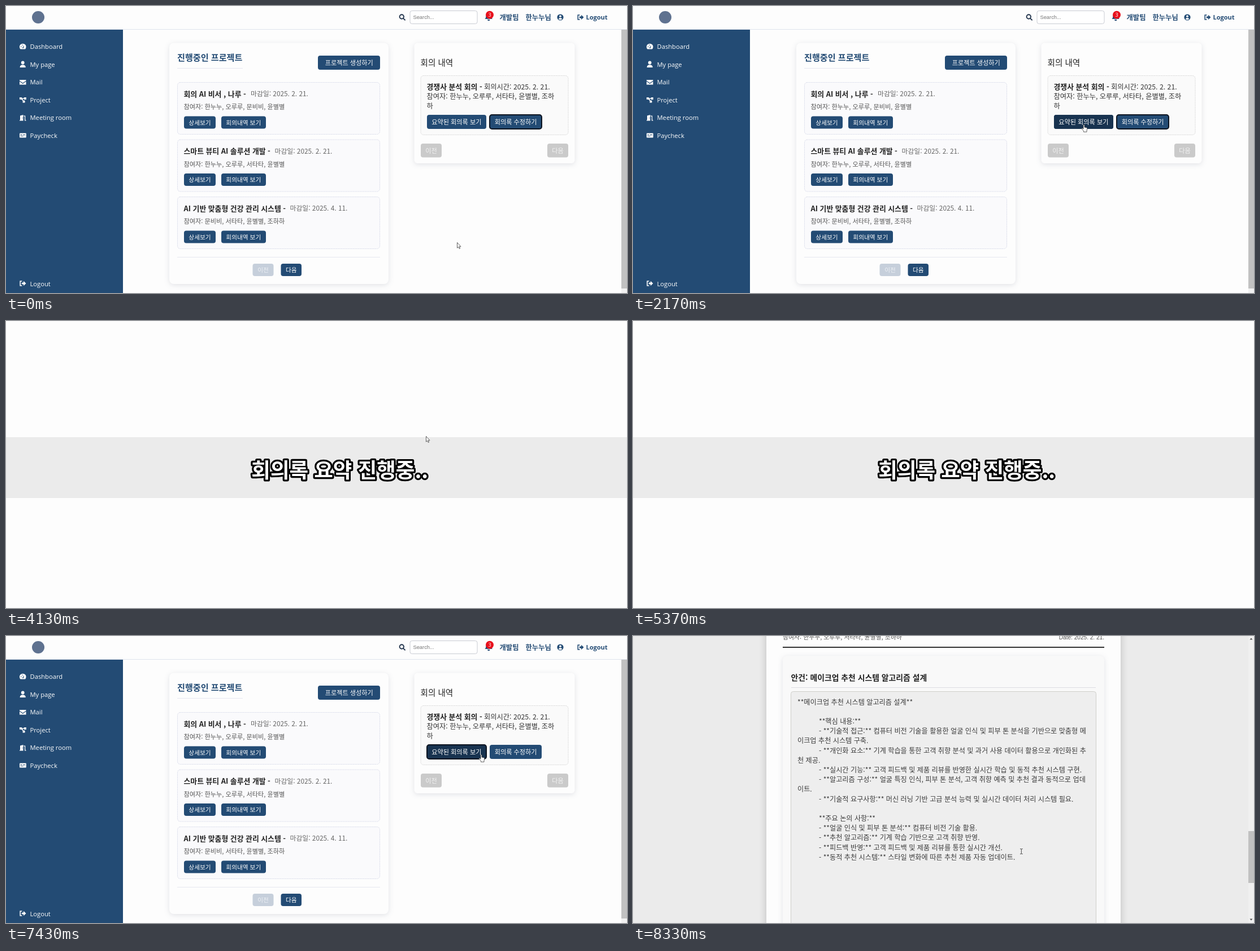
Animation, 1099 px wide and 509 px high, one loop 8.36 s. Source, as an HTML page:

```html
<!DOCTYPE html>
<html lang="ko">
<head>
<meta charset="utf-8">
<title>Meeting summary</title>
<style>
  html, body { margin: 0; width: 100%; height: 100%; overflow: hidden; background: #fdfdfd; }
  svg { position: absolute; left: 0; top: 0; width: 1099px; height: 509px; }
  .scene, #stage { position: absolute; left: 0; top: 0; width: 1099px; height: 509px; overflow: hidden; }
  text, pre { font-family: "Noto Sans CJK KR", "Noto Sans CJK", "Noto Sans", sans-serif; }
  text { font-size: 11.15px; fill: #555; white-space: pre; }
  .bold { font-weight: 700; font-size: 12.85px; fill: #222; }
  .date { font-size: 11.85px; fill: #666; }
  .body { font-size: 12.25px; fill: #333; }
  .navy { fill: #234b74; }
  .white { fill: #fdfdfd; }
  .mid { text-anchor: middle; }
  .small { font-size: 10.7px; }
  .latin { font: 500 11.2px "Open Sans", "Noto Sans", sans-serif; }
  .arial { font: 10.1px "Liberation Sans", Arial, sans-serif; }
  .panel { fill: #fdfdfd; filter: drop-shadow(0 2px 5px rgba(40, 50, 80, .13)); }
  .card { fill: #fafafc; stroke: #d9dcea; stroke-dasharray: 2 1; }
  .line { fill: none; stroke: #e6e7f0; }
  .ring { fill: none; stroke: #0d1420; stroke-width: 2; }
  .caption {
    font-size: 36.5px; font-weight: 700; fill: #fff;
    stroke: #000; stroke-width: 6.4px; stroke-linejoin: round; paint-order: stroke;
  }

  #dash, #doc, #banner, #early, #late, .hover, .arrow, .beam, #pointer { animation: 8360ms step-end infinite; }
  #dash { animation-name: dash; }
  #doc, .beam { animation-name: doc; }
  #banner { animation-name: banner; }
  #early { animation-name: early; }
  #late { animation-name: late; }
  .hover { animation-name: hover; }
  .arrow { animation-name: arrow; }
  #pointer { animation-name: move; animation-timing-function: ease-in-out; }

  @keyframes dash { 0% { opacity: 1 } 41.03% { opacity: 0 } 69.38% { opacity: 1 } 96.53%, 100% { opacity: 0 } }
  @keyframes doc { 0% { opacity: 0 } 98.68%, 100% { opacity: 1 } }
  @keyframes banner { 0% { opacity: 0 } 45.5% { opacity: 1 } 69.38%, 100% { opacity: 0 } }
  @keyframes early { 0% { opacity: 1 } 50%, 100% { opacity: 0 } }
  @keyframes late { 0% { opacity: 0 } 50%, 100% { opacity: 1 } }
  @keyframes hover {
    0% { opacity: 0 } 16.2% { opacity: 1 } 41.03% { opacity: 0 }
    74.3% { opacity: 1 } 96.53%, 100% { opacity: 0 }
  }
  @keyframes arrow {
    0% { opacity: 1 } 16.2% { opacity: 0 } 41.03% { opacity: 1 }
    74.3% { opacity: 0 } 96.53% { opacity: 1 } 98.68%, 100% { opacity: 0 }
  }
  @keyframes move {
    0%, 6% { transform: translate(798px, 419px) }
    17.9%, 43% { transform: translate(798px, 210px) }
    49.2%, 52% { transform: translate(743px, 204px) }
    61.4% { transform: translate(661px, 257px) }
    64.2%, 70% { transform: translate(322px, -16px) }
    75.5%, 90% { transform: translate(841px, 210px) }
    95%, 100% { transform: translate(830px, 209px) }
  }

  #doc { background: #ebebeb; }
  pre {
    position: absolute; left: 291px; top: 108.6px; margin: 0;
    font-size: 12.17px; line-height: 17.2px; color: #3c3c3c; tab-size: 38px;
  }
</style>
</head>
<body>
<div id="stage">
  <svg id="dash" viewBox="0 0 1099 509">
    <defs>
      <g id="exit">
        <path d="M4.5 1H1.2V9H4.5" fill="none" stroke="currentColor" stroke-width="1.6"/>
        <path d="M3.8 3.5H7V.8L11.5 5 7 9.2V6.5H3.8Z" fill="currentColor"/>
      </g>
      <g id="frame">
        <rect class="card" x="303.5" y="135.5" width="358" height="92" rx="5"/>
        <g class="navy">
          <rect x="315" y="195.5" width="56" height="22" rx="4"/>
          <rect x="381" y="195.5" width="79" height="22" rx="4"/>
        </g>
        <text class="small white mid" x="343" y="210.7">상세보기</text>
        <text class="small white mid" x="420.3" y="210.7">회의내역 보기</text>
      </g>
    </defs>
    <rect width="1099" height="509" fill="#fdfdfd"/>

    <!-- header -->
    <path d="M0 41.5H1099" stroke="#dfe3ec"/>
    <circle cx="57" cy="20" r="11" fill="#5f7290"/>
    <g fill="none" stroke="#22344c" stroke-width="1.9">
      <circle cx="700.3" cy="19" r="3.7"/>
      <path d="M703 21.8L706.6 25.4"/>
    </g>
    <rect x="715" y="8.5" width="119" height="23" rx="3.5" fill="#fff" stroke="#c9ccd3"/>
    <text class="arial" x="720.5" y="23" style="font-size:9.3px;fill:#777">Search...</text>
    <g class="navy">
      <path d="M847.5 23Q849.5 21 849.5 17A4.5 4.5 0 0 1 858.5 17Q858.5 21 861 23Z"/>
      <path d="M852 24H856.5A2.2 2.2 0 0 1 852 24Z"/>
    </g>
    <circle cx="856" cy="15.8" r="7" fill="#e8101c"/>
    <text class="latin white mid" x="856" y="19" style="font-size:9px">3</text>
    <text class="bold navy" x="873.5" y="24.7" style="font-size:12.3px">개발팀</text>
    <text class="bold navy" x="919.5" y="24.7" style="font-size:12.3px">한누누님</text>
    <circle class="navy" cx="981" cy="20" r="5.6"/>
    <g class="white"><circle cx="981" cy="18.2" r="1.9"/><path d="M977.8 23.2Q978.5 21 981 21T984.2 23.2Q981 25.6 977.8 23.2Z"/></g>
    <use href="#exit" x="1011" y="15" color="#234b74"/>
    <text class="latin navy" x="1026.5" y="24.2" style="font-weight:700;font-size:11px">Logout</text>

    <!-- sidebar -->
    <rect class="navy" y="42" width="207" height="467"/>
    <text class="latin white" x="42.5" y="76.2">Dashboard</text>
    <text class="latin white" x="42.5" y="107.7">My page</text>
    <text class="latin white" x="42.5" y="139.2">Mail</text>
    <text class="latin white" x="42.5" y="170.8">Project</text>
    <text class="latin white" x="42.5" y="202.3">Meeting room</text>
    <text class="latin white" x="42.5" y="233.8">Paycheck</text>
    <text class="latin white" x="42.5" y="496.7">Logout</text>
    <g class="white">
      <path d="M25.6 76.5A5.8 5.8 0 1 1 33.9 76.5Z"/>
      <circle cx="29.7" cy="100.5" r="2.9"/>
      <path d="M24.6 109Q24.6 104.3 29.7 104.3T34.8 109Z"/>
      <path d="M24 131H35.5V132.4L29.7 136.6 24 132.4ZM24 133.8L29.7 138 35.5 133.8V139.5H24Z"/>
      <path d="M24 162H28V163.3H32V162H35.8V166H32V164.7H29L31 167.5H33.5V171.5H29.6V168L27.2 165.8H24Z"/>
      <path d="M25 194.5L30.5 193V203.5H24V202.3H25ZM31.3 194.5H34.2V202.3H35.5V203.5H33V195.8H31.3Z"/>
      <rect x="24" y="225.5" width="11.8" height="8" rx="1"/>
    </g>
    <g class="navy">
      <path d="M28.8 74.8L32 69.6 31 74.8Z"/>
      <circle cx="26.7" cy="72.3" r=".8"/><circle cx="29" cy="69.2" r=".8"/>
      <circle cx="29" cy="198.6" r=".7"/>
      <path d="M25.5 228H28.5V229H25.5ZM30 228H34.2V229H30ZM25.5 230.5H31V231.3H25.5Z"/>
    </g>
    <use href="#exit" x="24" y="487" color="#fdfdfd"/>

    <!-- projects -->
    <rect class="panel" x="289" y="65.5" width="388" height="427.5" rx="8"/>
    <text class="bold navy" x="303" y="96.5" style="font-size:15.1px">진행중인 프로젝트</text>
    <path class="line" d="M303 110.5H419M303 445.5H662"/>
    <rect class="navy" x="552" y="88" width="110" height="25" rx="4"/>
    <text class="white mid" x="607.3" y="104.8">프로젝트 생성하기</text>

    <use href="#frame"/>
    <text class="bold" x="314.5" y="160.5">회의 AI 비서 , 나루 -</text>
    <text class="date" x="433" y="160.2">마감일: 2025. 2. 21.</text>
    <text x="314.5" y="183.3">참여자: 한누누, 오루루, 문비비, 윤별별</text>

    <g transform="translate(0 101.5)">
      <use href="#frame"/>
      <text class="bold" x="314.5" y="160.5">스마트 뷰티 AI 솔루션 개발 -</text>
      <text class="date" x="475.5" y="160.2">마감일: 2025. 2. 21.</text>
      <text x="314.5" y="183.3">참여자: 한누누, 오루루, 서타타, 윤별별</text>
    </g>

    <g transform="translate(0 203)">
      <use href="#frame"/>
      <text class="bold" x="314.5" y="160.5">AI 기반 맞춤형 건강 관리 시스템 -</text>
      <text class="date" x="502.5" y="160.2">마감일: 2025. 4. 11.</text>
      <text x="314.5" y="183.3">참여자: 문비비, 서타타, 윤별별, 조하하</text>
    </g>

    <rect x="436.5" y="457" width="37" height="22" rx="4" fill="#c6cfdb"/>
    <rect class="navy" x="486.5" y="457" width="36.5" height="22" rx="4"/>
    <text class="small mid" x="455" y="472.2" style="fill:#eef1f5">이전</text>
    <text class="small white mid" x="504.8" y="472.2">다음</text>

    <!-- meetings -->
    <rect class="panel" x="722.5" y="65.5" width="284" height="213.5" rx="6"/>
    <text x="733.5" y="105.6" style="font-size:14.6px;font-weight:500;fill:#222">회의 내역</text>
    <rect class="card" x="734" y="123.5" width="261" height="105" rx="5" style="fill:#fafafa;stroke:#dadada"/>
    <text class="bold" x="744.5" y="148.3">경쟁사 분석 회의 -</text>
    <text class="body" x="846" y="148">회의시간: 2025. 2. 21.</text>
    <text class="body" x="744.5" y="164.8">참여자: 한누누, 오루루, 서타타, 윤별별, 조하</text>
    <text class="body" x="744.5" y="182">하</text>
    <g class="navy">
      <rect x="745" y="193" width="105" height="25" rx="4"/>
      <rect x="856" y="193" width="92" height="25" rx="4"/>
    </g>
    <rect class="hover" x="745" y="193" width="105" height="25" rx="4" fill="#183350"/>
    <rect id="early" class="ring" x="856" y="193" width="92" height="25" rx="4"/>
    <rect id="late" class="ring" x="745" y="193" width="105" height="25" rx="4"/>
    <text class="white mid" x="797.3" y="209.7">요약된 회의록 보기</text>
    <text class="white mid" x="902.2" y="209.7">회의록 수정하기</text>
    <g fill="#cacaca">
      <rect x="734" y="244" width="37" height="24.5" rx="4"/>
      <rect x="958" y="244" width="37" height="24.5" rx="4"/>
    </g>
    <text class="mid" x="752.5" y="260.5" style="fill:#f2f2f2">이전</text>
    <text class="mid" x="976.5" y="260.5" style="fill:#f2f2f2">다음</text>

    <rect x="1089" y="42" width="10" height="467" fill="#f1f1f1"/>
    <rect x="1089" y="42" width="10" height="459" fill="#c1c1c1"/>
  </svg>

  <svg id="banner" viewBox="0 0 1099 509">
    <rect y="206" width="1099" height="108" fill="#ebebeb"/>
    <text class="caption" x="434.3" y="277.8">회의록 요약 진행중..</text>
  </svg>

  <div id="doc" class="scene">
    <svg viewBox="0 0 1099 509">
      <rect x="236" y="-20" width="627" height="560" fill="#fdfdfd" style="filter:drop-shadow(0 0 7px rgba(0,0,0,.2))"/>
      <text x="265" y="6.3" style="font-size:10.9px">참여자: 한누누, 오루루, 서타타, 윤별별, 조하하</text>
      <text class="arial" x="834" y="6" text-anchor="end">Date: 2025. 2. 21.</text>
      <path d="M265 20H834" stroke="#333" stroke-width="2"/>
      <rect class="panel" x="265" y="35" width="569" height="500" rx="8" style="fill:#f9f9f9"/>
      <text class="bold" x="279.5" y="79.4" style="font-size:13.87px">안건: 메이크업 추천 시스템 알고리즘 설계</text>
      <path d="M280 91.5H819" stroke="#dcdce2"/>
      <rect x="279.5" y="98.5" width="540" height="440" rx="4" fill="#eee" stroke="#cfcfca"/>
      <rect x="1089" width="10" height="509" fill="#f0f0f0"/>
      <rect x="1089" y="346" width="10" height="92" fill="#c1c1c1"/>
      <path d="M1091.5 6.5L1094 3.5 1096.5 6.5ZM1091.5 501.5L1094 504.5 1096.5 501.5Z" fill="#505050"/>
    </svg>
    <pre>**메이크업 추천 시스템 알고리즘 설계**

	**핵심 내용:**
	- **기술적 접근:** 컴퓨터 비전 기술을 활용한 얼굴 인식 및 피부 톤 분석을 기반으로 맞춤형 메
이크업 추천 시스템 구축.
	- **개인화 요소:** 기계 학습을 통한 고객 취향 분석 및 과거 사용 데이터 활용으로 개인화된 추
천 제공.
	- **실시간 기능:** 고객 피드백 및 제품 리뷰를 반영한 실시간 학습 및 동적 추천 시스템 구현.
	- **알고리즘 구성:** 얼굴 특징 인식, 피부 톤 분석, 고객 취향 예측 및 추천 결과 동적으로 업데
이트.
	- **기술적 요구사항:** 머신 러닝 기반 고급 분석 능력 및 실시간 데이터 처리 시스템 필요.

	**주요 논의 사항:**
	- **얼굴 인식 및 피부 톤 분석:** 컴퓨터 비전 기술 활용.
	- **추천 알고리즘:** 기계 학습 기반으로 고객 취향 반영.
	- **피드백 반영:** 고객 피드백 및 제품 리뷰를 통한 실시간 개선.
	- **동적 추천 시스템:** 스타일 변화에 따른 추천 제품 자동 업데이트.</pre>
  </div>

  <svg viewBox="0 0 1099 509">
    <g id="pointer" fill="#fff" stroke="#3a3a3a" stroke-width=".8" stroke-linejoin="round">
      <path class="arrow" d="M.5 .5V10.2L2.7 8.2 4.2 11.5 5.6 10.9 4.2 7.7H7Z"/>
      <path class="hover" d="M-1 1Q0-.6 1 1V5L4.8 5.8Q6 6.2 5.8 7.6L5 11V13.3H-.5V11.5L-4 7.8Q-3.6 6.3-2.2 7L-1 8.2Z"/>
    </g>
    <path class="beam" d="M685 377.5H686.6L687.3 378 688 377.5H689.6M687.3 378V386M685 386.5H686.6L687.3 386 688 386.5H689.6" fill="none" stroke="#333" stroke-width=".9"/>
  </svg>
</div>
</body>
</html>
```
